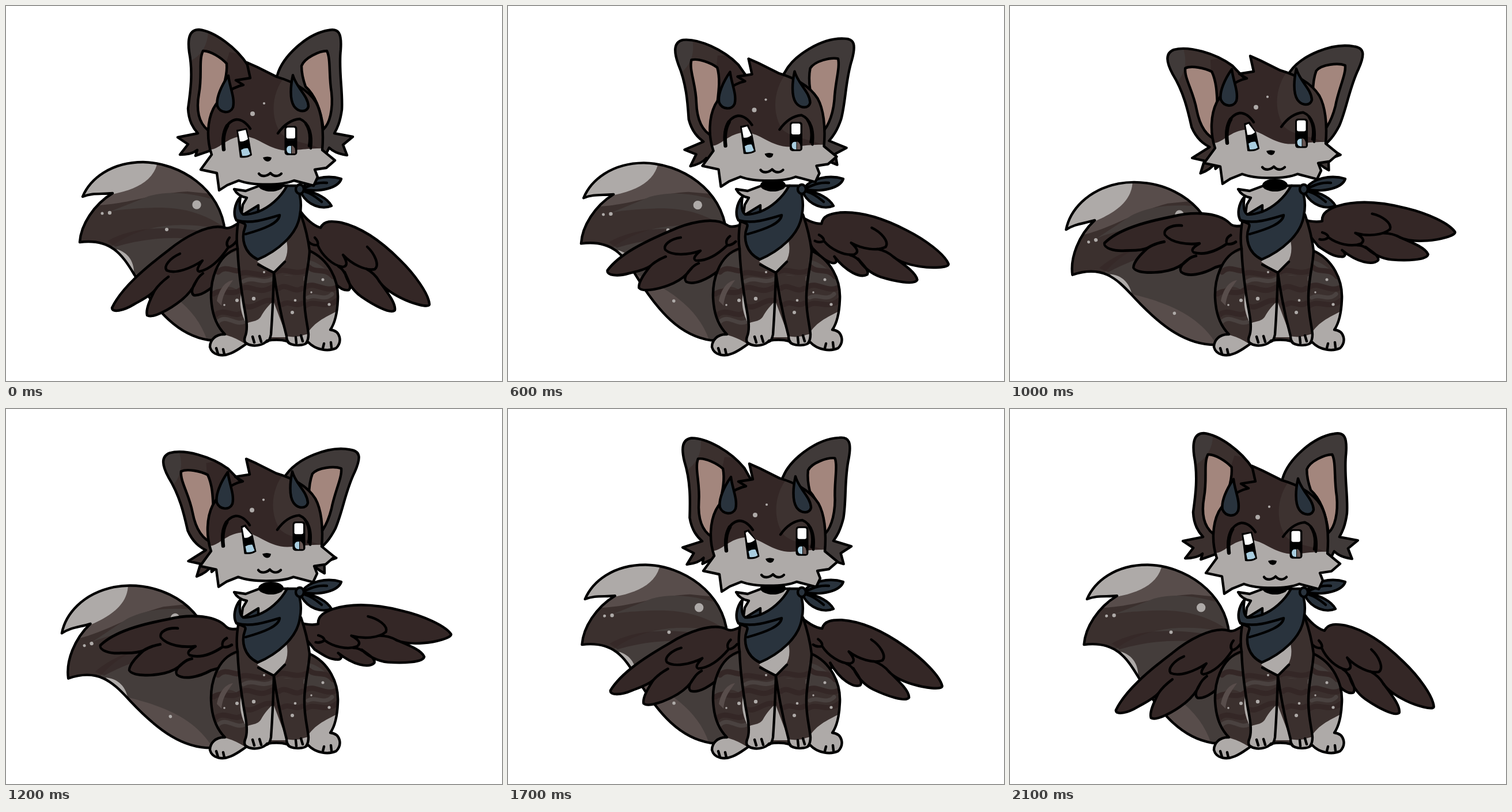
Animation, 861 px wide and 651 px high, one loop 2200 ms. Source, as an HTML page:

```html
<!DOCTYPE html>
<html lang="en">
<head>
<meta charset="utf-8">
<title>Winged fox</title>
<style>
html, body { margin: 0; width: 100%; height: 100%; overflow: hidden; background: #fff; }
svg { display: block; width: 861px; height: 651px; }
.o { stroke: #000; stroke-width: 4.4; stroke-linejoin: round; stroke-linecap: round; }
.l { fill: none; }
.dark { fill: #342726; } .brown { fill: #3b302e; } .ash { fill: #443d3b; }
.tan { fill: #584d4b; } .pale { fill: #aeaaa8; } .navy { fill: #29333d; }
.pink { fill: #a3867d; } .blue { fill: #a9cddf; }
.sw { fill: none; stroke: #342726; stroke-width: 9; stroke-linecap: round; }
.wisp { fill: none; stroke: #4a4240; stroke-width: 7; stroke-linecap: round; }
</style>
</head>
<body>
<svg viewBox="0 0 861 651">
<defs>
  <path id="tailShape" d="M133 331C146 300 182 271 238 271C302 272 374 318 380 392L410 480L400 580L352 580C300 572 262 532 222 465C202 432 182 403 128 410C130 380 152 345 185 325C165 327 150 324 133 331Z"/>
  <path id="bodyShape" d="M403 375C400 395 400 410 402 421C366 432 352 478 357 518C360 544 370 560 380 570C364 569 354 580 354 592C358 607 376 609 390 603C402 598 410 591 418 586C428 592 446 590 453 581C465 579 478 579 488 582C494 591 518 591 524 583C538 598 560 600 573 594C584 583 581 564 563 562C570 552 575 535 576 510C578 475 560 440 527 425C524 400 519 382 512 362Z"/>
  <path id="legs" d="M403 375C400 410 402 455 410 500C414 530 420 555 415 574C412 584 416 589 430 589C446 588 458 586 460 575L487 575C488 586 496 589 508 588C524 587 528 580 525 568C519 540 515 505 521 470C525 430 519 385 512 362Z"/>
  <path id="headShape" d="M418 98L436 106L470 123C504 133 526 148 538 167C548 185 552 215 549 250L571 268L556 281L536 284L541 297L534 312L500 303C478 312 428 312 404 303L384 311L370 320L366 290L338 284L357 258C348 232 349 200 360 178C370 160 388 142 412 137L399 129L424 125Z"/>
  <path id="earShapeL" d="M440 150L420 103C400 72 362 44 335 41C318 41 315 57 318 80C325 116 320 150 316 178C317 200 325 212 333 221L298 228L316 240L302 258C315 258 326 255 332 250L329 260L352 252L420 200Z"/>
  <clipPath id="tailClip"><use href="#tailShape"/></clipPath>
  <clipPath id="bodyClip"><use href="#bodyShape"/></clipPath>
  <clipPath id="legClip"><use href="#legs"/></clipPath>
  <clipPath id="headClip"><use href="#headShape"/></clipPath>
  <clipPath id="earClip"><use href="#earShapeL"/></clipPath>
</defs>

<g id="tail">
  <g clip-path="url(#tailClip)">
    <rect x="90" y="250" width="340" height="350" class="brown"/>
    <path class="tan" d="M120 345C200 352 240 326 315 322L355 326L340 250H120Z"/>
    <path class="ash" d="M248 330C290 318 340 326 400 350V400C340 350 290 348 235 351C205 353 190 354 178 358Z"/>
    <path class="ash" d="M180 420C240 372 330 370 420 400V610H180Z"/>
    <path d="M176 408C230 378 300 382 385 398L380 412C310 398 250 400 190 418Z" fill="#342726" opacity=".7"/>
    <path class="tan" d="M215 460C280 490 335 525 352 590H250Z"/>
    <path class="pale" d="M125 335C190 328 258 320 264 265H120Z"/>
    <path class="pale" d="M192 422C212 428 224 444 222 470Z"/>
    <g class="pale"><circle cx="331" cy="345" r="7.7"/><circle cx="279" cy="388" r="3"/><circle cx="167" cy="360" r="2.5"/><circle cx="180" cy="359" r="3.2"/><circle cx="288" cy="511" r="2.8"/></g>
  </g>
  <use href="#tailShape" class="o l"/>
</g>

<g id="wingL">
  <path class="o dark" d="M412 372C398 380 388 388 380 385C352 376 306 404 282 424C240 456 200 490 184 524C184 533 204 529 222 518C234 511 248 505 258 494C250 510 242 527 245 537C254 543 284 527 304 511C314 503 324 492 330 478C322 490 321 499 326 502C340 504 362 488 380 465L420 430Z"/>
  <path class="o l" d="M302 430C284 438 273 452 279 459C294 466 322 455 341 442C332 454 330 460 336 461C358 456 376 434 386 419M388 402Q380 412 386 419Q394 417 400 408M282 470Q266 482 258 494M342 464Q334 470 330 478"/>
</g>
<g id="wingR">
  <path class="o dark" d="M508 352C520 370 535 382 546 385C552 372 566 373 582 376C620 385 655 412 683 440C709 465 734 500 735 518C734 525 704 516 686 507C670 499 656 490 648 478C662 497 677 516 675 528C668 536 636 518 616 504C602 494 592 478 588 462C594 476 601 488 595 493C582 496 562 478 550 446C554 457 548 460 540 453C530 446 524 432 518 420Z"/>
  <path class="o l" d="M627 418C640 430 649 450 640 457C624 460 600 448 585 432C592 444 594 452 584 453C566 450 548 432 541 415M536 402Q543 409 541 415Q532 416 526 410M625 456Q640 464 648 478M577 452Q584 456 588 464"/>
</g>

<g clip-path="url(#bodyClip)">
  <rect x="340" y="340" width="250" height="280" class="brown"/>
  <path class="ash" d="M350 480C364 440 390 425 410 425V500C390 480 370 484 350 510ZM522 440C548 446 570 466 580 500C560 484 540 480 518 486Z"/>
  <path class="sw" d="M368 462C384 446 398 468 412 456M360 500C374 488 390 506 408 492M362 538C378 520 398 546 412 530M524 452C538 466 552 452 568 470M520 488C536 476 556 502 578 486M518 522C536 506 552 530 576 510"/>
  <path class="wisp" d="M366 550C382 532 396 556 414 548M524 506C538 498 552 514 566 500"/>
  <path class="tan" d="M366 512C370 492 380 478 394 476C384 490 376 500 374 520Z"/>
  <path class="pale" d="M340 572C366 562 398 574 420 590V620H340ZM514 585C530 550 548 544 574 530L590 610H514Z"/>
  <path class="pale" d="M411 490C403 508 406 535 420 556Z"/>
  <g clip-path="url(#legClip)">
    <rect x="390" y="350" width="150" height="250" class="brown"/>
    <path class="wisp" d="M412 478C430 468 444 484 462 474M474 474C490 464 504 480 520 472"/>
    <path class="sw" d="M404 466C420 456 440 474 462 462M406 492C424 480 436 504 462 488M412 520C430 530 444 506 464 512M468 462C486 452 500 470 524 458M468 490C490 478 504 506 524 488M474 516C492 504 506 526 520 512"/>
    <path class="pale" d="M436 444C448 430 470 412 487 408C492 432 484 448 465 463ZM404 560C420 544 432 552 442 540C450 526 456 520 464 512L487 573C500 574 514 572 530 568V600H404Z"/>
    <path class="brown" d="M466 466L487 573C500 576 514 574 522 568L516 510V470Z"/>
    <path class="sw" d="M474 490C488 480 500 500 514 490M480 518C492 510 502 524 514 516"/>
  </g>
  <g class="pale"><circle cx="401" cy="511" r="3"/><circle cx="430" cy="508" r="3.2"/><circle cx="448" cy="462" r="2"/><circle cx="379" cy="519" r="1.8"/><circle cx="502" cy="511" r="2.3"/><circle cx="497" cy="532" r="3"/><circle cx="550" cy="475" r="2.5"/><circle cx="561" cy="518" r="2.6"/><circle cx="530" cy="497" r="1.7"/></g>
</g>
<use href="#bodyShape" class="o l"/>
<path class="o l" d="M402 421C403 455 408 490 413 520C418 545 420 562 415 574Q412 583 418 586M465 463C464 500 462 542 460 570Q458 582 452 583M465 463C470 500 478 540 487 573Q487 580 490 583M527 425C526 450 517 480 518 510C518 535 524 555 525 570Q525 580 521 585M438 449L465 463L484 444M428 574L431 584M440 573L443 583M503 575L504 585M512 572L515 582M365 594L368 604M377 596L379 605M552 586L550 594M564 584L565 593"/>

<path class="o pale" d="M396 318L416 321L440 312H490L478 336L437 359L408 366L411 345L418 333C408 331 400 326 396 318Z"/>
<path class="o navy" d="M407 331C396 344 394 362 400 372C409 377 418 376 415 384C408 402 412 428 437 440C470 426 505 398 510 364C514 344 511 326 504 312H488C476 334 456 350 438 357L438 346L412 362Q403 357 407 331Z"/>
<path class="o l" d="M401 372C424 379 452 370 475 363C474 377 448 387 416 396M414 362Q424 362 438 357"/>
<path class="o navy" d="M515 315C526 300 556 292 582 300C577 316 546 323 516 319ZM516 320C540 324 558 334 565 347C548 354 524 346 513 326Z"/>
<path class="o l" d="M516 317C534 308 544 306 557 307M518 322C534 327 542 335 548 340"/>
<ellipse cx="510" cy="318" rx="7" ry="8" class="o navy"/>
<ellipse cx="460" cy="311" rx="22" ry="11"/>

<g id="head">
  <g id="earL">
    <g clip-path="url(#earClip)">
      <rect x="280" y="30" width="180" height="250" class="brown"/>
      <path fill="#403a39" d="M310 30H350C354 60 344 88 310 100Z"/>
      <path class="dark" d="M388 80L440 90V200H350Z"/>
    </g>
    <use href="#earShapeL" class="o l"/>
    <path class="o pink" d="M342 78C354 77 374 90 383 100C385 124 374 148 364 180C358 198 354 208 350 215C334 202 330 180 335 152C341 120 334 94 342 78Z"/>
  </g>
  <g id="earR">
    <path class="o" fill="#403a39" d="M460 150L471 120C480 88 522 48 560 42C578 38 583 48 581 76C577 112 585 148 583 180C580 202 575 212 570 221L602 227L585 241L592 259C577 257 567 252 561 246L553 262L535 250L480 200Z"/>
    <path class="o pink" d="M513 104C518 90 544 78 557 78C564 92 560 120 565 150C568 180 562 204 551 214C548 190 540 158 520 140C515 126 513 116 513 104Z"/>
  </g>
  <g clip-path="url(#headClip)">
    <rect x="330" y="90" width="250" height="240" class="dark"/>
    <path fill="#3d3230" d="M486 120C460 150 458 195 478 222C500 240 530 235 560 255V120Z"/>
    <path class="pale" d="M330 249H357C372 247 384 228 410 226C436 226 448 244 478 250C502 254 520 243 580 249V340H330Z"/>
    <circle cx="428" cy="187" r="4" class="pale"/><circle cx="448" cy="169" r="2.1" class="pale"/>
  </g>
  <use href="#headShape" class="o l"/>
  <path class="o navy" d="M386 121C374 138 364 160 367 174C372 186 389 188 394 176C398 160 388 140 386 121ZM498 120C494 138 492 162 500 174C508 185 523 185 525 174C524 155 504 142 498 120Z"/>
  <g id="eyeL">
    <path id="irisL"/>
    <path id="shineL" fill="#fff"/>
    <path class="blue" d="M408 250Q414 246 420 247L424 257Q418 261 410 260Z"/>
  </g>
  <g id="eyeR">
    <rect x="483.500" y="208" width="22" height="51" rx="5"/>
    <rect x="486.500" y="211" width="15.500" height="19" rx="3" fill="#fff"/>
    <path class="blue" d="M487 248Q488 242 495 243V256Q487 257 487 248Z"/>
    <path fill="#665653" d="M496 242Q503 244 502 256H496Z"/>
  </g>
  <path class="o l" d="M378 249C373 222 382 200 400 197C412 197 420 207 424 213M472 221C484 204 498 197 510 196C527 203 532 224 529 247M520 204C528 216 528 232 526 243"/>
  <path class="l" d="M378 249C376 232 378 218 384 208" stroke="#000" stroke-width="6.500" stroke-linecap="round"/>
  <path d="M446 263Q454 260 461 263Q460 270 454 270Q448 269 446 263Z"/>
  <path class="o l" d="M439 291C443 297 453 296 459 290C465 297 473 296 478 291"/>
</g>
</svg>
<script>
const $ = id => document.getElementById(id);
const LOOP = 2200, STEP = 100;

// pairs of time and value
const swing = [[0,0],[200,.06],[400,.26],[600,.57],[800,.87],[1000,.99],[1100,1.02],[1200,1],[1400,.83],[1500,.69],[1700,.31],[1800,.18],[1900,.08],[2100,.01],[2200,0]];
const droop = [[0,0],[400,0],[600,.5],[700,2.8],[800,6.3],[900,9.5],[1000,11.6],[1100,12.3],[1200,11.8],[1300,9.3],[1500,2.7],[1600,.6],[1700,-.2],[2200,-.2]];
const drift = [[0,0],[400,0],[800,-1],[1200,-1],[1500,0],[1700,1],[2100,2],[2200,2]];
const look = [[0,0],[400,2],[800,10],[1200,15],[1500,17],[1700,15],[1900,7],[2100,0],[2200,0]];

function at(keys, t) {
  let i = 1;
  while (i < keys.length - 1 && keys[i][0] < t) i++;
  const [t0, a] = keys[i - 1], [t1, b] = keys[i];
  return a + (b - a) * (t - t0) / (t1 - t0);
}

const move = (id, value) => $(id).setAttribute("transform", value);

function draw(t) {
  const k = at(swing, t), gaze = at(look, t), q = gaze / 17, dx = at(drift, t);
  move("tail", `rotate(${-at(droop, t)} 397 535)`);
  move("wingL", `translate(395 385) matrix(${1 - .114 * k} ${.508 * k} ${-.3175 * k} ${1 - .048 * k} 0 0) translate(-395 -385)`);
  move("wingR", `translate(0 ${-3 * k}) rotate(${-30.8 * k} 528 388)`);
  move("head", `translate(${dx} ${-11 * k + dx * .4})`);
  move("earL", `rotate(${-21 * k} 436 199)`);
  move("earR", `rotate(${20 * k} 466 170)`);
  move("eyeL", `translate(${gaze * .57} 0)`);
  move("eyeR", `translate(${gaze} ${-1.5 * q})`);
  // the upper lid cuts the left iris as it turns
  const x = 11 * q;
  $("irisL").setAttribute("d", `M400 215L${418 - x} 212L${422 - q} ${230 + q}L427 259Q418 265 406 263Z`);
  $("shineL").setAttribute("d", `M403 218L${416 - x} ${215 + q}L${420 - q} ${231 - q}Q413 236 406 235Z`);
}

function tick(now) {
  draw(Math.floor(now % LOOP / STEP) * STEP);
  requestAnimationFrame(tick);
}
draw(0);
requestAnimationFrame(tick);
</script>
</body>
</html>
```
